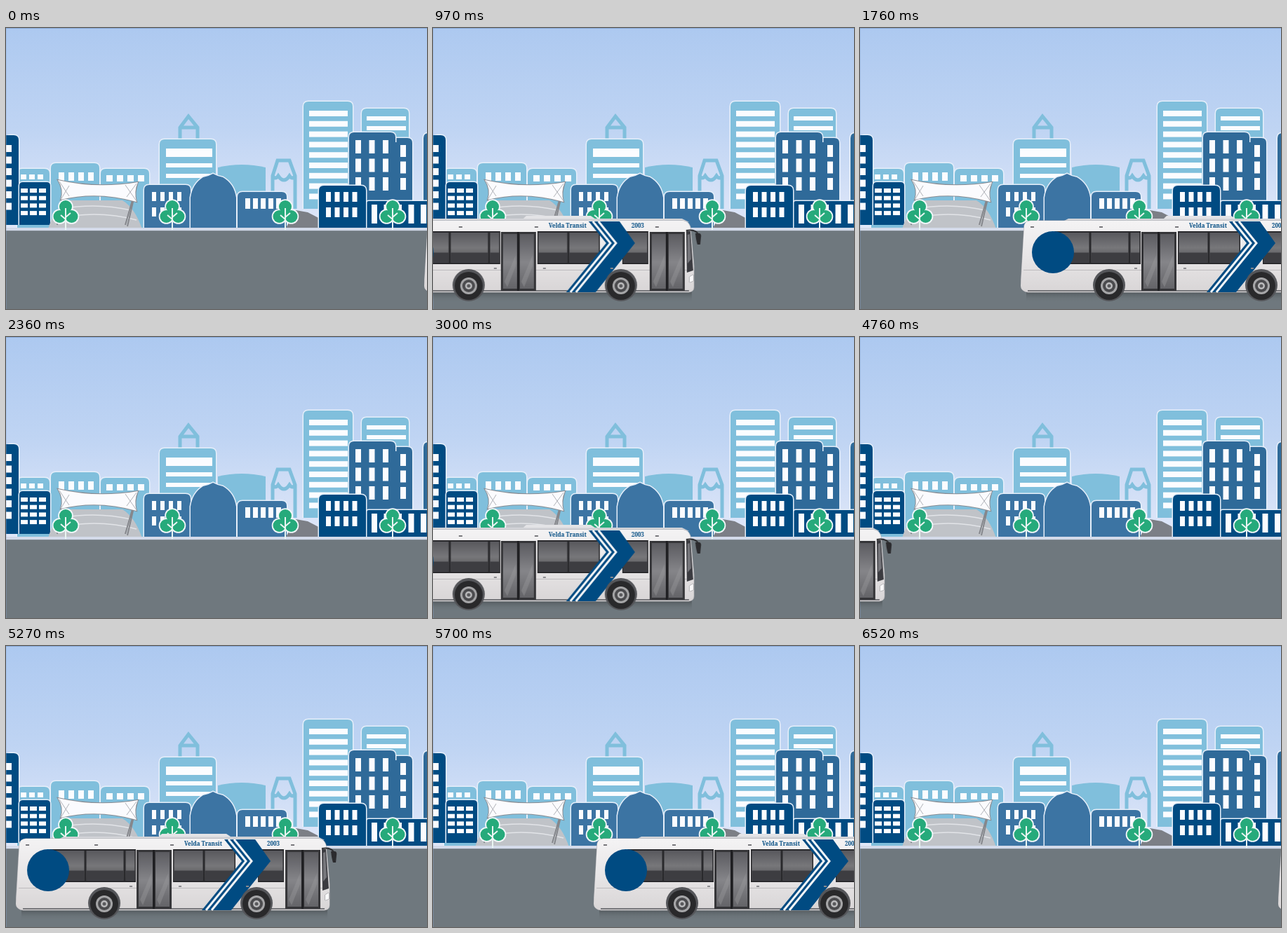
Recreate the animation shown at these times as an HTML page with a canvas. Size 600 by 401 pixels, loop 6550 ms.

```html
<!DOCTYPE html>
<html>
<head>
<meta charset="utf-8">
<style>
html, body { margin: 0; width: 100%; height: 100%; overflow: hidden; }
canvas { display: block; }
</style>
</head>
<body>
<canvas id="stage" width="600" height="401"></canvas>
<script>
const W = 600, H = 401, LOOP = 6550;
const NAVY = '#004b82', STEEL = '#2f6a99', BLUE = '#3c74a3', PALE = '#80bfdc', EDGE = '#e6effa';

let g;

function layer(width, paint) {
  const canvas = document.createElement('canvas');
  canvas.width = width;
  canvas.height = H;
  g = canvas.getContext('2d');
  paint();
  return canvas;
}

function rect(color, x, y, w, h) {
  g.fillStyle = color;
  g.fillRect(x, y, w, h);
}

function shape(d, fill, stroke, width = 2) {
  const path = new Path2D(d);
  if (stroke) {
    g.strokeStyle = stroke;
    g.lineWidth = width;
    g.stroke(path);
  }
  if (fill) {
    g.fillStyle = fill;
    g.fill(path);
  }
}

function disc(color, x, y, r) {
  g.fillStyle = color;
  g.beginPath();
  g.arc(x, y, r, 0, 7);
  g.fill();
}

function vertical(y0, y1, ...colors) {
  const fade = g.createLinearGradient(0, y0, 0, y1);
  colors.forEach((c, i) => fade.addColorStop(i / (colors.length - 1), c));
  return fade;
}

// Block with rounded top corners and a light rim
function block(color, x, y, w, bottom, r = 7) {
  shape(`M${x} ${bottom}V${y + r}q0 ${-r} ${r} ${-r}h${w - 2 * r}q${r} 0 ${r} ${r}V${bottom}`, color, EDGE, 3);
}

function panes(x, y, w, h, cols, dx, rows = 1, dy = 0) {
  for (let r = 0; r < rows; r++)
    for (let c = 0; c < cols; c++) rect('#fbfcff', x + c * dx, y + r * dy, w, h);
}

function tree(x) {
  const lobes = [[0, 255, 9], [-8.5, 269, 9], [8.5, 269, 9], [0, 266, 8]];
  for (const [dx, y, r] of lobes) disc('#f2f8fa', x + dx, y, r + 1.8);
  for (const [dx, y, r] of lobes) disc('#26aa7b', x + dx, y, r);
  shape(`M${x} 257V288M${x} 273l-7 -6M${x} 270l7 -6`, null, '#e9f5f2', 2);
}

function paintPavilion() {
  shape('M60 287Q68 257 92 246H166Q184 257 194 287Z', '#c0c3c8');
  shape('M78 258Q130 249 178 260M72 272Q130 259 186 274', null, '#e2e4e8', 1.5);
  shape('M80 240L73 281M187 222L173 283M180 246L170 281', null, '#85878c', 2);
  shape('M74 217Q130 230 188 220Q182 233 186 248Q130 232 78 245Q83 231 74 217Z', '#fbfbfe', '#898b91', 2);
  shape('M76 219L90 240M186 222L172 241M90 225L78 245M170 224L186 247', null, '#b0b2b8', 1);
}

function paintCity() {
  rect(vertical(0, 288, '#adc9f0', '#bfd4f3', '#e1e8f9'), 0, 0, W, 289);

  block(PALE, 16, 201, 46, 286);
  panes(21, 209, 8, 7, 3, 12);
  block(PALE, 64, 193, 69, 286);
  panes(75, 206, 8, 12, 4, 14);
  block(PALE, 135, 201, 69, 286);
  panes(143, 210, 9, 9, 4, 15);
  shape('M248 158V142L260 126L273 142V158M248 142H273', null, PALE, 5);
  shape('M302 286V199Q336 191 370 199V286Z', PALE);
  block(PALE, 219, 159, 80, 286);
  panes(228, 172, 66, 12, 1, 0);
  panes(228, 193, 66, 6, 1, 0, 2, 15);
  shape('M380 258V211L387 189H404L412 211V258M380 211Q384 217 388 211Q396 223 404 211Q408 217 412 211', null, PALE, 5);
  block(PALE, 424, 105, 70, 258);
  panes(432, 118, 55, 8, 1, 0, 9, 14.8);
  block(PALE, 507, 115, 67, 250);
  panes(514, 126, 56, 6, 1, 0, 2, 14);

  block(STEEL, 550, 157, 29, 286);
  block(STEEL, 489, 149, 66, 286);
  rect(STEEL, 546, 163, 12, 122);
  panes(498, 160, 8, 19, 3, 19.5, 3, 26.5);
  panes(562, 167, 8, 17, 1, 0, 3, 23.5);
  block(STEEL, 595, 150, 30, 286);
  block(NAVY, 0, 153, 18, 281);
  rect(NAVY, 0, 153, 9, 128);
  panes(0, 167, 8, 10, 1, 0, 6, 16.5);
  block(NAVY, 19, 220, 44, 281, 5);
  panes(21, 229, 10, 6, 3, 13, 4, 10.7);

  paintPavilion();

  block(BLUE, 197, 224, 66, 285);
  panes(208, 234, 6, 13, 4, 12, 2, 22);
  block(BLUE, 330, 234, 70, 285);
  panes(341, 243, 7, 15, 5, 11);
  shape('M263 285V242Q266 222 281 213Q288 212 295 208Q302 212 309 213Q325 222 328 242V285Z', BLUE, EDGE, 3);
  shape('M398 287L413 260L430 263L478 288Z', '#7c7f86');
  block(NAVY, 514, 247, 100, 286, 3);
  panes(521, 252, 8, 27, 5, 17.5);
  block(NAVY, 446, 225, 67, 285);
  panes(456, 234, 7, 14, 4, 12.5, 2, 22);

  rect('#d4dbea', 0, 285, W, 4);
  rect('#6f787e', 0, 289, W, H - 289);
  rect('#858e96', 0, 289, W, 1);
  [85, 237, 398, 551].forEach(tree);
  rect('#88a8d6', 0, 0, W, 1);
  rect('#88a8d655', 0, 0, 1, H);
}

function glass(x, w, y = 290, h = 47) {
  rect('#29292c', x, y, w, h);
  rect(vertical(y, y + h, '#55555a', '#77777a', '#4a4a4e'), x + 1.5, y + 2, w - 3, h - 4);
  rect('#3d3d41', x + 1.5, y + h * .65, w - 3, h * .3);
}

function door(x) {
  rect('#353538', x, 291, 50, 84);
  for (const dx of [3, 27]) {
    rect(vertical(294, 374, '#5b5b60', '#858589', '#626266'), x + dx, 294, 20, 78);
    shape(`M${x + dx + 2} 362l16 -38v16l-12 30z`, '#9a9a9d66');
  }
  rect('#1f1f22', x + 23, 291, 3, 84);
}

function wheel(x) {
  disc('#55565a', x, 367, 23);
  disc('#29292b', x, 368, 20);
  disc('#a6a6a8', x, 368, 12);
  disc('#4b4b4e', x, 368, 9);
  disc('#bcbcbe', x, 368, 5);
  disc('#59595c', x, 368, 2.5);
}

function paintBus() {
  rect(vertical(375, 391, '#44494dcc', '#6f787e00'), 8, 375, 436, 16);
  shape('M200 276L208 268H300L312 276Z', '#e3e3e6');
  shape('M60 276L68 272H430L440 277Z', '#d5d6da');
  shape('M0 368L5 282Q6 276 14 275H432Q440 276 442 284L447 340V370Q447 376 440 377H10Q1 376 0 368Z',
    vertical(275, 377, '#f4f3f4', '#e8e6e7', '#d8d5d6'), '#a5a5aa', 1);
  rect('#bdbbbd', 4, 345, 440, 1);
  rect('#77777b', 10, 374, 430, 2);

  glass(48, 51);
  glass(99, 56);
  glass(155, 16);
  glass(224, 44);
  glass(268, 45);
  glass(345, 37);
  door(172);
  door(384);
  shape('M436 290H442L446 346L437 349Z', '#3b3b40');
  shape('M438 295L441 294L443 330L438 336Z', '#77777c');
  shape('M441 355l5 -3v9l-5 2z', '#f9f9fa', '#8a8a8e', 1);
  shape('M436 289Q449 287 453 294', null, '#2c2c2f', 2);
  shape('M449 293h6q3 1 2 6l-1 10h-4q-2 -6 -3 -16z', '#2b2b2e');

  shape('M297 276H341L363 307L307 377H265L322 307Z', NAVY);
  for (const dx of [6, 14]) shape(`M${297 + dx} 276L${322 + dx} 307L${265 + dx} 377`, null, '#f3f4f6', 3);
  disc(NAVY, 46, 320, 30);
  g.fillStyle = NAVY;
  g.font = 'bold 8px "Noto Serif", serif';
  g.fillText('Velda Transit', 240, 285);
  g.fillText('2003', 358, 285);
  for (const x of [14, 112, 220, 392]) rect('#77777b', x, 283, 5, 2);
  for (const x of [162, 232, 328]) rect('#8a8a8e', x, 342, 4, 2);
  wheel(126);
  wheel(343);
}

const city = layer(W, paintCity);
const bus = layer(470, paintBus);

// Start and end of each passage; the bus glides in, waits, then pulls away
const RUNS = [[60, 2150], [2300, 4180], [4330, 6330]];
const STOP = 229, EXIT = 596;

function busX(t) {
  const run = RUNS.find(([start, end]) => t >= start && t < end);
  if (!run) return EXIT;
  const left = run[1] - t;
  if (left > 650) return STOP - 305 * ((left - 650) / 530) ** 1.35;
  if (left > 390) return STOP;
  return STOP + (EXIT - STOP) * (1 - left / 390) ** 3;
}

const screen = document.getElementById('stage').getContext('2d');
const begin = performance.now();

function frame() {
  const t = (performance.now() - begin) % LOOP;
  screen.drawImage(city, 0, 0);
  screen.drawImage(bus, busX(t), 0);
  requestAnimationFrame(frame);
}
frame();
</script>
</body>
</html>
```
